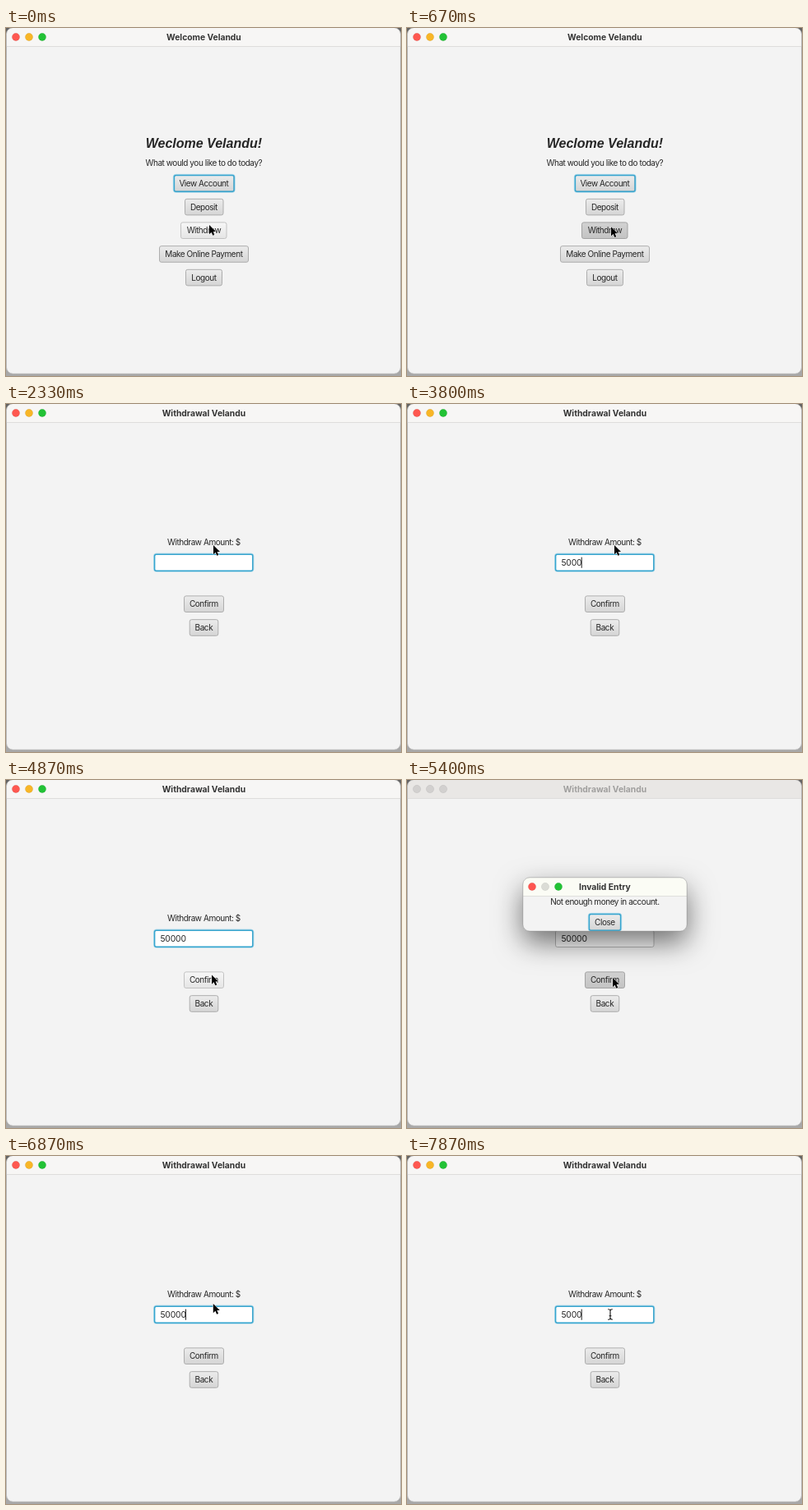
These frames come from a looping animation (480 by 424 pixels, 8000 ms). An HTML page:

```html
<!DOCTYPE html>
<html lang="en">
<head>
<meta charset="utf-8">
<title>Withdrawal</title>
<style>
  html, body { margin: 0; width: 100%; height: 100%; overflow: hidden; background: #a2a2a2; }
  svg { display: block; width: 480px; height: 424px; }
  text { font: 10px Inter, Roboto, sans-serif; letter-spacing: -.45px; fill: #262626; white-space: pre; }
  text.mid { text-anchor: middle; }
  text.title { font-weight: 700; font-size: 10.3px; letter-spacing: 0; fill: #333; }
  text.head { font: italic 700 16px "Liberation Sans", Arial, sans-serif; letter-spacing: 0; }
  text.num { font-size: 10.3px; letter-spacing: -.15px; }
</style>
</head>
<body>
<svg id="stage" viewBox="0 0 480 424">
  <defs>
    <linearGradient id="up" x2="0" y2="1"><stop stop-color="#ececec"/><stop offset="1" stop-color="#d5d5d5"/></linearGradient>
    <linearGradient id="hover" x2="0" y2="1"><stop stop-color="#f7f7f7"/><stop offset="1" stop-color="#e5e5e5"/></linearGradient>
    <linearGradient id="down" x2="0" y2="1"><stop stop-color="#d2d2d2"/><stop offset="1" stop-color="#c3c3c3"/></linearGradient>
    <linearGradient id="desk" x2="0" y2="1"><stop stop-color="#626262"/><stop offset="1" stop-color="#a8a8a8"/></linearGradient>
    <filter id="shadow" x="-50%" y="-100%" width="200%" height="320%">
      <feDropShadow dx="0" dy="14" stdDeviation="17" flood-opacity=".55"/>
    </filter>
    <clipPath id="winClip"><rect x=".5" y="0" width="479" height="421.3" rx="8"/></clipPath>
    <clipPath id="boxClip"><rect x="141" y="119" width="199" height="65" rx="8"/></clipPath>
  </defs>
</svg>
<script>
const LOOP = 8000, FRAME = 1000 / 15;
const NAME = "Velandu";
const RING = "#36a5cf";
const stage = document.getElementById("stage");

function add(parent, tag, attrs = {}, content = "") {
  const el = document.createElementNS("http://www.w3.org/2000/svg", tag);
  for (const key in attrs) el.setAttribute(key, attrs[key]);
  el.textContent = content;
  parent.append(el);
  return el;
}
const group = (parent, attrs) => add(parent, "g", attrs);
const rect = (parent, x, y, width, height, attrs) =>
  add(parent, "rect", { x, y, width, height, ...attrs });
const label = (parent, y, content, cls = "") =>
  add(parent, "text", { x: 240.4, y, class: "mid " + cls }, content);
const show = (el, on) => el.setAttribute("visibility", on ? "inherit" : "hidden");

function lights(parent, x, y, colors) {
  return colors.map((fill, i) =>
    add(parent, "circle", { cx: x + 16 * i, cy: y, r: 4.7, fill, stroke: "#000", "stroke-opacity": .1, "stroke-width": .6 }));
}

function focusRing(parent, x, y, w, h) {
  const g = group(parent);
  rect(g, x - .7, y - .7, w + 1.4, h + 1.4, { rx: 3, fill: "none", stroke: "#a9d8ea", "stroke-width": 1 });
  rect(g, x + .4, y + .4, w - .8, h - .8, { rx: 2, fill: "none", stroke: RING, "stroke-width": 1.5 });
  return g;
}

function button(parent, x, y, w, content, focused) {
  const h = 20.6;
  const face = rect(parent, x + .5, y + .5, w - 1, h - 1, { rx: 2.3, stroke: "#adadad" });
  if (focused) focusRing(parent, x, y, w, h);
  label(parent, y + 13.9, content);
  return {
    hit: (px, py) => px > x && px < x + w && py > y && py < y + h,
    set(state) {
      face.setAttribute("fill", `url(#${state})`);
      face.setAttribute("stroke", { up: "#adadad", hover: "#c2c2c2", down: "#a3a3a3" }[state]);
    }
  };
}

// Main window
rect(stage, 0, 0, 480, 424, { fill: "url(#desk)" });
const win = group(stage, { "clip-path": "url(#winClip)" });
rect(win, 0, 0, 480, 424, { fill: "#f3f3f3" });
const bar = rect(win, 0, 0, 480, 22.5);
rect(win, 0, 22, 480, 1, { fill: "#dedddc" });
const LIT = ["#fe5850", "#f8b627", "#22c235"];
const winLights = lights(win, 12, 11, LIT);
const title = label(win, 14.6, "", "title");
rect(stage, .5, -.5, 479, 421.8, { rx: 8, fill: "none", stroke: "#b3b3b3", "stroke-width": .8 });

// Welcome screen
const welcome = group(win);
label(welcome, 145.6, `Weclome ${NAME}!`, "head");
label(welcome, 167.6, "What would you like to do today?");
const menu = [
  button(welcome, 204, 179, 73.5, "View Account", true),
  button(welcome, 217, 207.8, 47.5, "Deposit"),
  button(welcome, 212, 236.4, 56.5, "Withdraw"),
  button(welcome, 186, 265.2, 109, "Make Online Payment"),
  button(welcome, 218, 293.8, 45, "Logout")
];

// Withdrawal screen
const form = group(win);
label(form, 171.6, "Withdraw Amount: $");
rect(form, 180.5, 183.3, 119.5, 20.2, { rx: 2.3, fill: "#fff", stroke: "#b9b9b9" });
const fieldRing = focusRing(form, 180.2, 182.8, 120, 20.8);
const amount = add(form, "text", { x: 187.4, y: 197.1, class: "num" });
const caret = rect(form, 0, 186.6, 1, 13.2, { fill: "#222" });
const confirmBtn = button(form, 216, 233.4, 49, "Confirm");
const backBtn = button(form, 222.7, 262.2, 35.6, "Back");

// Error dialog
const dialog = group(stage);
rect(dialog, 141, 119, 199, 65, { rx: 8, fill: "#f3f3f3", filter: "url(#shadow)" });
const box = group(dialog, { "clip-path": "url(#boxClip)" });
rect(box, 141, 119, 199, 22, { fill: "#fbfcf5" });
rect(box, 141, 141, 199, .8, { fill: "#dcdcd8" });
lights(box, 152, 130, ["#fe5550", "#dbdcd6", "#22c235"]);
label(box, 133.7, "Invalid Entry", "title");
label(box, 151.8, "Not enough money in account.");
const closeBtn = button(box, 221, 163, 39, "Close", true);
rect(dialog, 140.8, 118.8, 199.4, 65.4, { rx: 8.2, fill: "none", stroke: "#8d8d8d", "stroke-width": .5 });

// Pointers
const arrow = add(stage, "path", {
  d: "M0 0V11.2L2.6 8.8L4.3 12.8L6.3 12L4.6 8.1H8Z",
  fill: "#000", stroke: "#fff", "stroke-width": .9, "stroke-linejoin": "round", "paint-order": "stroke"
});
const beam = add(stage, "path", {
  d: "M-2.8 -6.3Q0 -6.3 0 -4.6Q0 -6.3 2.8 -6.3M0 -5V5M-2.8 6.3Q0 6.3 0 4.6Q0 6.3 2.8 6.3M-1.4 1.8H1.4",
  fill: "none", stroke: "#111", "stroke-width": 1.1
});

// Pointer path: time, x, y
const PATH = [
  [0, 247, 240], [400, 248, 242], [930, 248, 242.5], [1067, 251, 205], [1200, 252.5, 146],
  [1333, 252, 172], [4400, 252, 172], [4867, 250, 237.5], [4980, 250, 237.5], [5000, 250, 241],
  [5800, 250, 241], [6400, 254, 174], [6667, 254, 174], [7200, 247, 193], [LOOP, 247, 193]
];
const TYPED = [[0, ""], [3130, "5"], [3330, "50"], [3470, "500"], [3800, "5000"], [4130, "50000"], [7870, "5000"]];
// Times at which the caret turns on and off, in turn
const BLINK = [800, 1330, 1800, 2330, 2800, 4630, 5130, 5330, 6730, 7730, 7870, LOOP];

const within = (t, from, to) => t >= from && t < to;

function pointerAt(t) {
  const time = Math.floor((t + 4) / FRAME) * FRAME;
  const i = Math.max(1, PATH.findIndex(p => p[0] > time));
  const [t0, x0, y0] = PATH[i - 1], [t1, x1, y1] = PATH[i];
  const u = (time - t0) / (t1 - t0), k = u * u * (3 - 2 * u);
  return [x0 + (x1 - x0) * k, y0 + (y1 - y0) * k];
}

function render(t) {
  const [x, y] = pointerAt(t);
  const home = t < 800, modal = within(t, 5330, 6670);
  const look = (btn, enabled, pressed) =>
    btn.set(pressed ? "down" : enabled && btn.hit(x, y) ? "hover" : "up");

  show(welcome, home);
  show(form, !home);
  show(dialog, modal);
  dialog.setAttribute("opacity", t < 5400 ? .65 : 1);

  title.textContent = `${home ? "Welcome" : "Withdrawal"} ${NAME}`;
  title.style.fill = modal ? "#a09f9e" : "";
  bar.setAttribute("fill", modal ? "#e9e7e5" : "#f7f6f5");
  winLights.forEach((c, i) => c.setAttribute("fill", modal ? "#d2d0cf" : LIT[i]));

  menu.forEach((btn, i) => look(btn, home, i === 2 && within(t, 600, 800)));
  look(confirmBtn, !modal, within(t, 5130, 6730));
  look(backBtn, !modal, false);
  look(closeBtn, modal, within(t, 6530, 6670));

  const value = TYPED.filter(step => step[0] <= t).pop()[1];
  amount.textContent = value;
  caret.setAttribute("x", 186.7 + 6.25 * value.length);
  show(caret, !home && BLINK.filter(b => b <= t).length % 2 === 1);
  show(fieldRing, !home && !within(t, 5330, 6730));

  const overField = !home && !modal && within(y, 183, 204);
  show(arrow, !overField);
  show(beam, overField);
  for (const p of [arrow, beam]) p.setAttribute("transform", `translate(${x} ${y})`);
}

const start = performance.now();
function tick() {
  render((performance.now() - start) % LOOP);
  requestAnimationFrame(tick);
}
tick();
</script>
</body>
</html>
```
